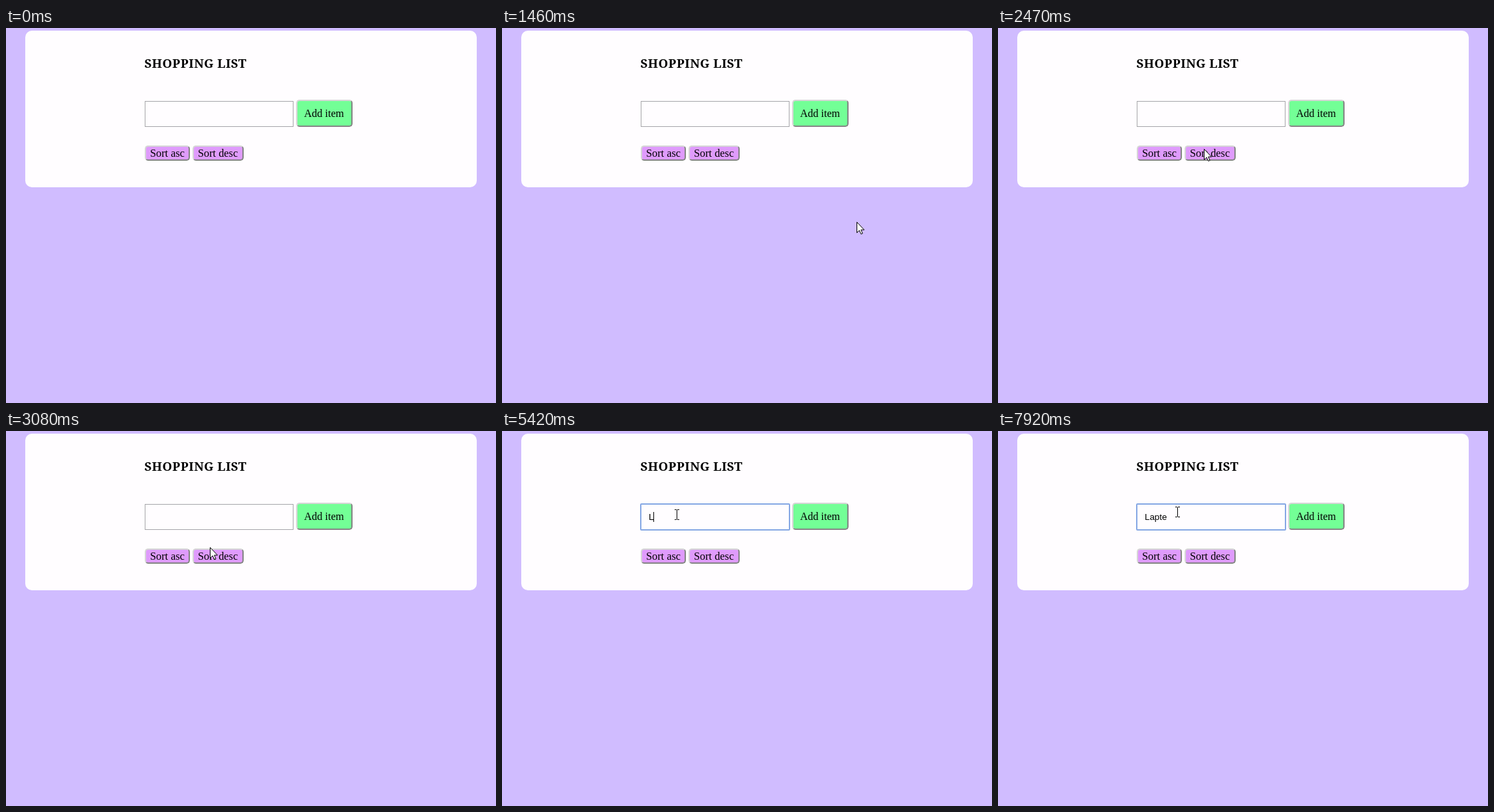
An HTML page that plays this animation: 738x565 px, repeating every 7.99 s.

```html
<!DOCTYPE html>
<html lang="en">
<head>
<meta charset="utf-8">
<title>Shopping list</title>
<style>
  html, body { margin: 0; width: 100%; height: 100%; overflow: hidden; background: #d0bcff; }
  .card, .btn, .field, svg { position: absolute; box-sizing: border-box; }
  .card { left: 29px; top: 4px; width: 680px; height: 236px; border-radius: 10px; background: #fffdff; }
  .btn { border: 2px solid; border-color: #d6d6d6 #858585 #858585 #d6d6d6; border-radius: 5px; background: #df9bfc; }
  .add { left: 437px; top: 108px; width: 85px; height: 41px; background: #73ff96; }
  .asc { left: 209px; top: 177px; width: 68px; height: 23px; }
  .desc { left: 281px; top: 177px; width: 77px; height: 23px; }
  .field { left: 209px; top: 110px; width: 224px; height: 39px; border: 1px solid #a6a6aa; }
  .field.focus { left: 208px; top: 109px; width: 226px; height: 41px; border: 2px solid #86a8e4; border-radius: 2px; }
  svg { left: 0; top: 0; }
  text { font: 16px "Liberation Serif", serif; white-space: pre; }
  .title { font: bold 18.6px "Noto Serif", serif; letter-spacing: .45px; }
  .sort { font-size: 16.3px; }
  .typed { font: 13.333px "Liberation Sans", sans-serif; }
</style>
</head>
<body>
<div class="card"></div>
<div class="field" id="field"></div>
<div class="btn add"></div>
<div class="btn asc"></div>
<div class="btn desc"></div>
<svg width="738" height="565" viewBox="0 0 738 565">
  <text class="title" x="208.5" y="60">SHOPPING LIST</text>
  <text x="449" y="134">Add item</text>
  <text class="sort" x="217" y="194">Sort asc</text>
  <text class="sort" x="289" y="194">Sort desc</text>
  <text class="typed" id="typed" x="221" y="134"></text>
  <rect id="caret" y="122" width="1" height="15"/>
  <path id="arrow" d="M.5 .5V16.5L4.2 13L6.8 18.5L9.1 17.5L6.7 12.1H11.5Z" fill="#fff" stroke="#000"/>
  <path id="beam" d="M-3 -7.5H0M1 -7.5H4M.5 -7V7M-3 7.5H0M1 7.5H4" fill="none" stroke="#000" shape-rendering="crispEdges"/>
</svg>
<script>
const LOOP = 7990, FOCUS = 3860, BLINK = 550, BLINK_START = 3770, SAMPLE = 77;
const WORD = "Lapte", keyTimes = [5420, 5730, 5880, 6190, 6260];
const $ = id => document.getElementById(id);
const field = $("field"), typed = $("typed"), caret = $("caret"), arrow = $("arrow"), beam = $("beam");

// Each stroke starts where the last one ended; power 1 is linear
const ENTRY = { x: 601, y: 604 };
const strokes = [
  { at: 840, steps: 3, x: 550, y: 395, power: 1 },
  { at: 1310, steps: 5, x: 509, y: 138, power: 1 },
  { at: 2080, steps: 6, x: 310, y: 182, power: 1 },
  { at: 2700, steps: 1, x: 310, y: 178, power: 1 },
  { at: 2930, steps: 8, x: 263, y: 126, power: 3 },
  { at: 7830, steps: 2, x: 270, y: 122, power: 1 }
];

const easeInOut = (k, power) =>
  k < .5 ? (2 * k) ** power / 2 : 1 - (2 - 2 * k) ** power / 2;
const show = (el, on) => el.setAttribute("visibility", on ? "visible" : "hidden");

// The pointer is sampled at a fixed rate, so it moves in steps
function pointerAt(t) {
  let pos = ENTRY;
  for (const s of strokes) {
    if (t < s.at) break;
    const step = Math.min(s.steps, 1 + Math.floor((t - s.at) / SAMPLE));
    const k = easeInOut(step / s.steps, s.power);
    pos = {
      x: Math.round(pos.x + (s.x - pos.x) * k),
      y: Math.round(pos.y + (s.y - pos.y) * k)
    };
  }
  return pos;
}

function drawPointer(t) {
  const { x, y } = pointerAt(t);
  const overField = x >= 209 && x < 433 && y >= 110 && y < 149;
  for (const el of [arrow, beam]) {
    el.setAttribute("transform", `translate(${x} ${y})`);
    show(el, (el === beam) === overField);
  }
}

function drawField(t) {
  const pressed = keyTimes.filter(k => k <= t);
  const text = WORD.slice(0, pressed.length);
  if (typed.textContent !== text) typed.textContent = text;

  const focused = t >= FOCUS;
  const blinkFrom = pressed.pop() || BLINK_START;
  field.classList.toggle("focus", focused);
  show(caret, focused && Math.floor((t - blinkFrom) / BLINK) % 2 === 0);
  caret.setAttribute("x", Math.floor(221 + (text ? typed.getComputedTextLength() : 0)));
}

function draw(t) {
  drawPointer(t);
  drawField(t);
}

const start = performance.now();
function tick(now) {
  draw(Math.max(0, now - start) % LOOP);
  requestAnimationFrame(tick);
}
draw(0);
requestAnimationFrame(tick);
</script>
</body>
</html>
```
